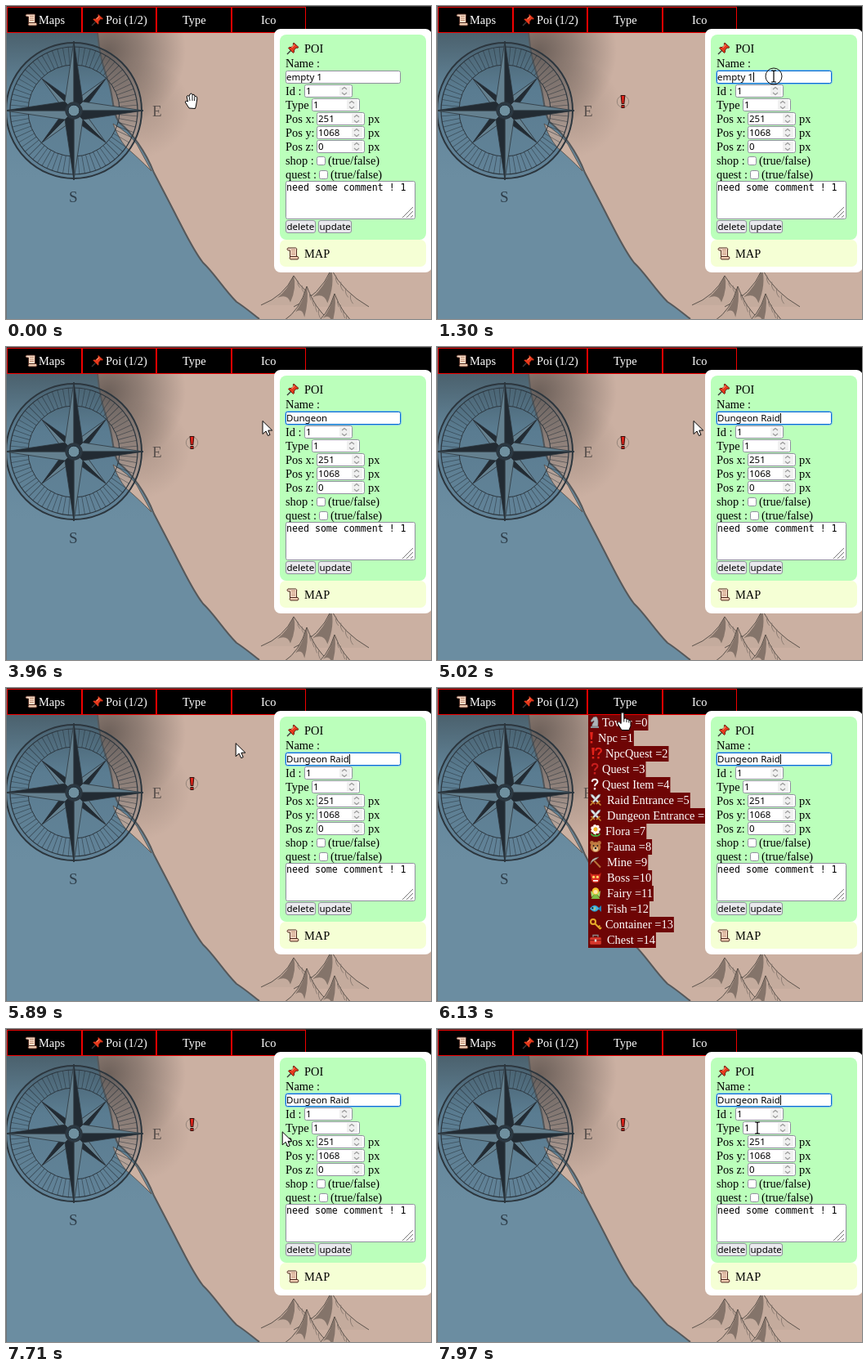
These frames come from a looping animation (520x383 px, 8 s). An HTML page with a canvas:

```html
<!DOCTYPE html>
<html lang="en">
<head>
<meta charset="utf-8">
<title>Map editor</title>
<style>
html, body { margin: 0; width: 100%; height: 100%; overflow: hidden; background: #000; }
canvas { display: block; width: 520px; height: 383px; }
</style>
</head>
<body>
<canvas id="stage" width="520" height="383"></canvas>
<script>
const g = document.getElementById('stage').getContext('2d');
const LOOP = 8000;
const SERIF = '14.4px "Liberation Serif", serif';
const SANS = '11.5px "Noto Sans", sans-serif';
const MONO = '11.6px "DejaVu Sans Mono", monospace';
const TAU = Math.PI * 2;

// ---------- helpers ----------
function text(s, x, y, font = SERIF, color = '#000') {
  g.font = font;
  g.fillStyle = color;
  g.fillText(s, x, y);
}
function textWidth(s, font) {
  g.font = font;
  return g.measureText(s).width;
}
function rect(x, y, w, h, color) {
  g.fillStyle = color;
  g.fillRect(x, y, w, h);
}
function paint(p, fill, line, width = 1) {
  if (fill) { g.fillStyle = fill; g.fill(p); }
  if (line) { g.strokeStyle = line; g.lineWidth = width; g.stroke(p); }
}
function path(d, fill, line, width) {
  paint(new Path2D(d), fill, line, width);
}
function disc(x, y, r, fill, line, width) {
  const p = new Path2D();
  p.arc(x, y, r, 0, TAU);
  paint(p, fill, line, width);
}
function round(x, y, w, h, r, fill, line, width) {
  const p = new Path2D();
  p.roundRect(x, y, w, h, r);
  paint(p, fill, line, width);
}
function at(x, y, draw, angle = 0) {
  g.save();
  g.translate(x, y);
  g.rotate(angle);
  draw();
  g.restore();
}
function glow(x, y, r, rgb, alpha) {
  const s = g.createRadialGradient(x, y, 0, x, y, r);
  s.addColorStop(0, `rgba(${rgb},${alpha})`);
  s.addColorStop(0.45, `rgba(${rgb},${alpha * 0.6})`);
  s.addColorStop(1, `rgba(${rgb},0)`);
  rect(x - r, Math.max(33, y - r), 2 * r, 2 * r, s);
}

// ---------- icons, centred on 0,0 ----------
const bang = color => () => path('M-1.8-7H1.8L1 2H-1zM-1.3 4H1.3V6.5H-1.3z', color);
const query = color => () => {
  path('M-3.2-3.2C-3-7.3 3.6-7.2 3.4-3.2C3.2-.8 0-1 0 2.2', null, color, 2.1);
  rect(-1.2, 4, 2.4, 2.5, color);
};
function sword(flip) {
  g.save();
  g.scale(flip, 1);
  path('M-6-7L-3-6.2L4 2L2.5 3.5L-5-4z', '#dfe4e8', '#7d8790', 0.6);
  path('M1 5L5.5 1M3.5 3.5L6.5 6.5', null, '#c98b32', 1.6);
  g.restore();
}
const icons = {
  scroll() {
    path('M-6-7H3.5Q5.5-6.5 4.5-4V4H-3.5V-4H-6Q-8-5.5-6-7z', '#f6dcc8', '#4f2a20', 1);
    path('M-3 3.5H6Q8 5 6 7H-3Q-5 5.5-3 3.5z', '#efcbb0', '#4f2a20', 1);
    path('M-2-4.5H3M-2-2H3M-2 .5H3', null, '#b98468', 0.9);
  },
  pin() {
    path('M-1 1L-7 7', null, '#3a3a3a', 1.4);
    path('M1-7L7-1.5L5.5-.5L4-1L1.5 2V4.5L.5 5.5L-5.5-.5L-4.5-1.5H-2L1-4L.3-5.7z', '#e5391c', '#5a1208', 0.9);
    path('M2-4.5L-1.5-1', null, '#ff8a66', 1.1);
  },
  tower() {
    path('M-3.5 5C-3.5 1-.5 0-1-2L-4 0L-5-2L-1.5-6.5L2-7C5-4 4 1 4 5z', '#aeb4b8', '#555', 0.6);
    rect(-5, 5, 10, 2, '#8a9195');
  },
  bang: bang('#e2231a'),
  bangQuery() {
    at(-3, 0, bang('#e2231a'));
    at(3.5, 0, query('#e2231a'));
  },
  queryRed: query('#c81e1e'),
  queryWhite: query('#f4f4f4'),
  swords() { sword(1); sword(-1); },
  flower() {
    path('M0 1V7M0 6Q-5 6-5 3M0 6Q5 6 5 3', null, '#49a63a', 1.8);
    for (let i = 0; i < 7; i++) disc(4 * Math.cos(i * TAU / 7), -2 + 4 * Math.sin(i * TAU / 7), 2.1, '#fff4ee');
    disc(0, -2, 2.4, '#f4b51f');
  },
  bear() {
    for (const s of [-1, 1]) disc(s * 4.5, -4.5, 2.4, '#b9743c');
    disc(0, 0.5, 6.3, '#c07c42');
    disc(0, 3.2, 3, '#ecc795');
    disc(-2.4, -1, 0.9, '#222');
    disc(2.4, -1, 0.9, '#222');
    disc(0, 2, 1.3, '#222');
  },
  pick() {
    path('M-2-2L6 6.5', null, '#b7743a', 2);
    path('M-6.5 3Q-6-5 4-6L1-3.5Q-4-2-6.5 3z', '#c9c6b8', '#666', 0.5);
  },
  ogre() {
    path('M-7-6L-4-4H4L7-6L5.5 0Q5.5 6.5 0 6.5T-5.5 0z', '#dd2f22', '#8b120b', 0.7);
    disc(-2.4, -0.8, 1.5, '#ffe36c');
    disc(2.4, -0.8, 1.5, '#ffe36c');
    rect(-3, 3, 6, 1.6, '#fff');
  },
  fairy() {
    path('M-6-3L-1 1L-5 5zM6-3L1 1L5 5z', '#a8dd72');
    path('M0-1L5.5 7H-5.5z', '#7dbd43');
    disc(0, -2.5, 4.2, '#f6c82d');
    disc(0, -1.6, 2.5, '#ffe4ac');
  },
  fish() {
    path('M3 0L7-4V4z', '#2384b8');
    path('M-7 0Q-1-8 4.5 0Q-1 7-7 0z', '#45b4df', '#1b76a5', 0.6);
    disc(-3.7, -0.8, 1, '#111');
    path('M-2 2Q0 0-1-2', null, '#e6c94e', 1.2);
  },
  key() {
    disc(-3, -3, 3, null, '#e5ab2a', 2);
    path('M-1-1L6 6M3.5 3.5L5.5 1.8M5.5 5.5L7 4', null, '#e5ab2a', 1.9);
  },
  chest() {
    path('M-3-3V-5.5H3V-3', null, '#888', 1.4);
    round(-7, -3, 14, 9, 1.5, '#d8372c', '#801810', 0.6);
    rect(-7, 0, 14, 1.2, '#841b16');
    rect(-1.2, -0.5, 2.4, 3, '#ddd');
  }
};
const icon = (name, x, y) => at(x, y, icons[name]);

// ---------- map ----------
function compass() {
  const ink = '#2c363e';
  at(83, 128, () => {
    disc(0, 0, 82, 'rgba(45,72,92,.14)');
    disc(0, 0, 83, null, ink, 2);
    disc(0, 0, 78, null, ink, 1.2);
    disc(0, 0, 56, null, ink, 1);
    for (let i = 0; i < 72; i++) {
      at(0, 0, () => rect(56, -0.4, 22, 0.8, 'rgba(38,48,56,.6)'), i * TAU / 72);
    }
    const point = (len, w, angle) => at(0, 0, () => {
      path(`M0 0L${w} ${-w}L${len} 0z`, '#64808f', ink, 0.8);
      path(`M0 0L${w} ${w}L${len} 0z`, '#222b33', ink, 0.8);
    }, angle);
    for (let i = 0; i < 4; i++) point(56, 8, (i + 0.5) * TAU / 4);
    for (let i = 0; i < 4; i++) point(85, 11, i * TAU / 4);
    disc(0, 0, 10, '#2c3b46', ink, 1.5);
    disc(0, 0, 7, '#6f909f', '#1b242c', 1);
  });
  const font = '19px "Liberation Serif", serif';
  text('E', 179, 135, font, '#5a514d');
  text('S', 77, 240, font, '#2f3f4b');
}
function peak(x, y, w, h) {
  const p = new Path2D(`M${x - w} ${y + h}Q${x - w * 0.3} ${y + h * 0.7} ${x} ${y}` +
    `Q${x + w * 0.3} ${y + h * 0.6} ${x + w} ${y + h}`);
  paint(p, '#c4ab9d', '#5c534c', 1);
  path(`M${x} ${y}Q${x + w * 0.1} ${y + h * 0.4} ${x - w * 0.1} ${y + h * 0.9}` +
    `Q${x - w * 0.2} ${y + h * 0.6} ${x - w * 0.5} ${y + h * 0.75}Q${x - w * 0.2} ${y + h * 0.5} ${x} ${y}`,
  'rgba(70,62,56,.5)');
  for (let i = 1; i < 5; i++) {
    const dx = w * i * 0.13, dy = h * i * 0.17;
    path(`M${x + dx} ${y + dy}q${-w * 0.04} ${h * 0.12} ${w * 0.06} ${h * 0.24}`, null, '#80736a', 0.8);
  }
}
function mountains() {
  peak(352, 330, 40, 36);
  peak(398, 322, 46, 46);
  peak(368, 343, 28, 42);
  peak(402, 352, 28, 40);
}
function map() {
  rect(0, 33, 520, 350, '#cbb0a2');
  glow(125, 55, 95, '52,48,46', 0.62);
  glow(165, 125, 60, '70,60,54', 0.2);
  const shore = 'M112 33C114 58 119 75 126 95C132 115 130 130 138 142C154 155 171 178 181 204' +
    'C193 227 201 242 210 260C222 283 230 300 241 314C255 327 266 346 282 362C293 369 302 377 310 383';
  const sea = g.createLinearGradient(0, 33, 0, 210);
  sea.addColorStop(0, '#4b616d');
  sea.addColorStop(0.4, '#62859a');
  sea.addColorStop(1, '#6b8da1');
  path(shore + 'H0V33z', sea);
  path(shore, null, '#56585a', 2);
  path('M131 144Q150 155 160 169L178 202Q160 184 147 173Q137 161 131 144z', '#cbb1a2', '#59534f', 0.9);
  compass();
  mountains();
}
function marker() {
  disc(227.5, 117, 7.2, null, '#8f8177', 0.9);
  path('M225.2 109.5H229.8L228.8 119.5H226.2zM226 121.5H229V124.5H226z', '#e4241b', '#3a100c', 1.1);
}

// ---------- menu ----------
const items = [
  ['tower', 'Tower', 202], ['bang', 'Npc', 197], ['bangQuery', 'NpcQuest', 206],
  ['queryRed', 'Quest', 202], ['queryWhite', 'Quest Item', 202], ['swords', 'Raid Entrance', 208],
  ['swords', 'Dungeon Entrance', 208], ['flower', 'Flora', 206], ['bear', 'Fauna', 208],
  ['pick', 'Mine', 208], ['ogre', 'Boss', 208], ['fairy', 'Fairy', 208],
  ['fish', 'Fish', 208], ['key', 'Container', 206], ['chest', 'Chest', 208]
];
function menuBar() {
  rect(0, 0, 520, 33, '#000');
  rect(0, 0, 520, 1, '#333');
  for (const y of [1, 32]) rect(1, y, 366, 1, '#f00000');
  for (const x of [92, 183, 275]) rect(x, 1, 2, 32, '#f00000');
  for (const x of [1, 366]) rect(x, 1, 1, 32, '#f00000');
  icon('scroll', 31, 17);
  icon('pin', 112, 17);
  text('Maps', 40, 22, SERIF, '#fff');
  text('Poi (1/2)', 122, 22, SERIF, '#fff');
  text('Type', 216, 22, SERIF, '#fff');
  text('Ico', 312, 22, SERIF, '#fff');
}
function dropdown() {
  items.forEach(([name, label, x], i) => {
    const s = `${label} =${i}`, y = 33 + i * 19;
    rect(185, y, x + textWidth(s, SERIF) + 1 - 185, 19, '#6e0505');
    icon(name, name === 'bang' ? 189 : x === 202 ? 193 : 194, y + 9);
    text(s, x, y + 14, SERIF, '#fff');
  });
}

// ---------- form ----------
const NAME = 'Dungeon Raid';
const typed = [[2380, 1], [2970, 2], [3030, 3], [3230, 4], [3430, 5], [3630, 6],
  [3760, 7], [4430, 8], [4490, 9], [4690, 10], [4960, 11], [5020, 12]];
const caretOn = [[1300, 1440], [2910, 3960], [4430, 5500], [5830, 6520], [6850, 7450], [7900, 8000]];

function field(x, y, w, h) {
  round(x + 0.5, y + 0.5, w - 1, h - 1, 2, '#fff', '#8f8f9d');
}
function nameField(t, cursorX) {
  field(342, 79, 141, 16);
  if (t >= 1300) {
    round(341.5, 78.5, 142, 17, 3, null, 'rgba(110,180,245,.8)');
    round(342.5, 79.5, 140, 15, 2, '#fff', '#0a6fd0');
  }
  let shown = 'empty 1';
  for (const [when, n] of typed) if (t >= when) shown = NAME.slice(0, n);
  text(shown, 343, 91, SANS);
  const end = 343 + textWidth(shown, SANS);
  if (t >= 1440 && t < 2380) {
    let i = shown.length;
    while (i > 0 && 343 + textWidth(shown.slice(0, i), SANS) > cursorX) i--;
    const x = 343 + textWidth(shown.slice(0, i), SANS);
    rect(x, 80, end - x, 14, '#0078d7');
    text(shown.slice(i), x, 91, SANS, '#fff');
  }
  if (caretOn.some(([a, b]) => t >= a && t < b)) rect(Math.round(end), 81, 1, 12, '#000');
}
function numberRow(label, value, y, x, w, unit) {
  text(label, 342, y + 13);
  field(x, y, w, 16);
  text(value, x + 2, y + 12, SANS);
  const c = x + w - 10;
  rect(c - 6, y + 2, 13, 12, '#f0f0f0');
  path(`M${c - 3} ${y + 6}l3-2.5l3 2.5M${c - 3} ${y + 10}l3 2.5l3-2.5`, null, '#999', 1.1);
  if (unit) text('px', 443, y + 13);
}
function checkRow(label, y, x) {
  text(label, 342, y);
  round(x + 0.5, y - 9.5, 10, 10, 2, '#fff', '#8f8f9d');
  text('(true/false)', x + 14, y);
}
function button(label, x, w) {
  round(x + 0.5, 262.5, w - 1, 15, 2.5, '#e9e9ed', '#8f8f9d');
  text(label, x + 1.5, 274, SANS);
}
function panel(t, cursorX) {
  round(328, 28, 193, 298, 8, '#fff');
  round(335, 35, 179, 251, 8, '#bbffbb');
  round(335, 286, 179, 33, 7, '#f5ffd5');
  icon('pin', 351, 52);
  text('POI', 365, 57);
  icon('scroll', 351, 303);
  text('MAP', 365, 308);
  text('Name :', 342, 75);
  nameField(t, cursorX);
  numberRow('Id :', '1', 96, 365, 59);
  numberRow('Type', '1', 113, 374, 59);
  numberRow('Pos x:', '251', 130, 380, 59, true);
  numberRow('Pos y:', '1068', 147, 380, 59, true);
  numberRow('Pos z:', '0', 164, 380, 59, true);
  checkRow('shop :', 194, 380);
  checkRow('quest :', 211, 383);
  field(342, 214, 159, 47);
  text('need some comment ! 1', 343, 226, MONO);
  path('M485 259L498 246M490 259L498 251M495 259L498 256', null, '#777', 1);
  button('delete', 342, 37);
  button('update', 382, 41);
}

// ---------- cursor ----------
const glide = p => (p + p * p * (3 - 2 * p)) / 2;
const brake = p => 1 - (1 - p) ** 1.5;
// start, end, steps, x, y, easing
const moves = [
  [640, 1300, 12, 412, 86, brake],
  [1440, 1570, 3, 314, 91, glide],
  [2380, 2380, 1, 314, 90, glide],
  [5760, 6190, 8, 219, 24, glide],
  [6520, 7050, 8, 230, 134, brake],
  [7260, 7970, 11, 392, 121, glide]
];
function cursorAt(t) {
  let x = 227, y = 116;
  for (const [a, b, n, tx, ty, ease] of moves) {
    if (t < a) break;
    const k = t >= b ? n : Math.floor((t - a) / (b - a) * (n - 1)) + 1;
    const e = ease(k / n);
    x += (tx - x) * e;
    y += (ty - y) * e;
  }
  return [x, y];
}
const cursors = {
  arrow() { path('M0 .5V16.5L4 13L6.5 18.5L9 17.5L6.8 12H11.7z', '#fff', '#000', 1); },
  beam() { path('M-3-7H-1L0-6L1-7H3M0-6V6M-3 7H-1L0 6L1 7H3', null, '#000', 1.2); },
  pointer() {
    path('M-1.8 1.5Q0-1 1.8 1.5V8Q4 6.5 5 8.7Q7 7.7 7.8 10Q10 9 10 12V17L8 22H-1L-6 14Q-6 11-3.5 12.5L-1.8 14z',
      '#fff', '#000', 1);
    path('M1.8 8V12M5 9V12.5M7.8 10V13', null, '#000', 0.9);
  },
  grab() {
    path('M-3 9L-7.5 2Q-7.5-1-4.5 1L-5.8-5Q-5-8-3-5.5L-2-8Q0-10.5 1-7.5Q3.5-9 4-5.5Q7-6.5 6.8-2L5.5 6L4.5 9.5z',
      '#fff', '#000', 1);
    path('M-3-5.5L-2 0M1-7.5V0M4-5.5L3.5 0', null, '#000', 0.9);
  }
};
function cursorKind(t, x, y, open) {
  if (t < 640) return 'grab';
  if (t >= 1300 && t < 2380) return 'beam';
  if (open) return 'pointer';
  const inName = x > 342 && x < 483 && y > 79 && y < 95;
  const inType = x > 374 && x < 418 && y > 113 && y < 130;
  return inName || inType ? 'beam' : 'arrow';
}

function frame(t) {
  const [x, y] = cursorAt(t);
  const open = t > 5760 && x < 310 && (t >= 6190 || y < 33);
  map();
  if (t >= 640) marker();
  menuBar();
  rect(0, 0, 1, 383, '#6e7478');
  if (open) dropdown();
  panel(t, x);
  if (t >= 1300 && t < 1710) disc(x, y, 10, 'rgba(255,255,255,.25)', '#111', 1);
  at(x, y, cursors[cursorKind(t, x, y, open)]);
}

const start = performance.now();
function tick() {
  frame((performance.now() - start) % LOOP);
  requestAnimationFrame(tick);
}
tick();
</script>
</body>
</html>
```
